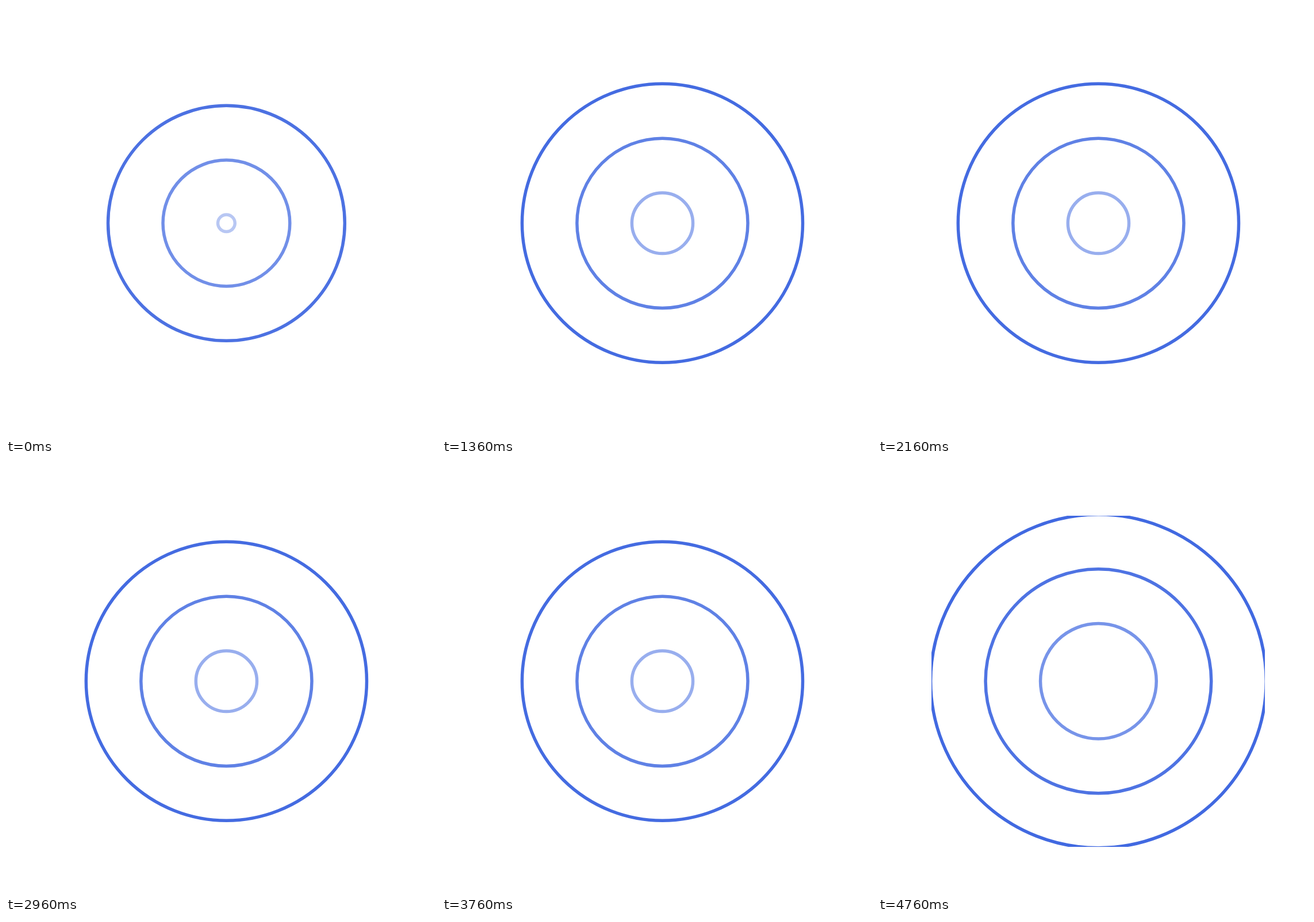
An HTML page that plays this animation: 748x748 px, repeating every 4.8 s.

```html
<!DOCTYPE html>
<html lang="en">
<head>
<meta charset="utf-8">
<title>Ripple</title>
<style>
  html, body { margin: 0; width: 100%; height: 100%; overflow: hidden; background: #fff; }
  svg { display: block; width: 748px; height: 748px; }
  ellipse { fill: none; stroke: #4169e1; stroke-width: 5.5; }
</style>
</head>
<body>
<svg viewBox="0 0 748 748">
  <clipPath id="box"><rect x="93.5" y="90" width="579.5" height="575.7"/></clipPath>
  <g id="rings" clip-path="url(#box)"></g>
</svg>
<script>
  const RINGS = 3, STEPS = 30, STEP_MS = 40;
  const LIFE = STEPS * STEP_MS;
  const START = 14.9, GROWTH = 9.55, ASPECT = 0.9935;

  const pose = n => {
    const r = START + GROWTH * n;
    return {
      rx: `${r}px`,
      ry: `${r * ASPECT}px`,
      opacity: 1 - 0.63 * (1 - n / STEPS) ** 2.2
    };
  };

  // Each pose holds for one step; the last one holds until the ring restarts.
  const frames = Array.from({ length: STEPS + 1 }, (_, n) => ({
    ...pose(Math.min(n, STEPS - 1)),
    offset: n / STEPS,
    easing: 'steps(1, end)'
  }));

  const group = document.getElementById('rings');
  for (let i = 0; i < RINGS; i++) {
    const ring = document.createElementNS('http://www.w3.org/2000/svg', 'ellipse');
    ring.setAttribute('cx', 383.4);
    ring.setAttribute('cy', 377.8);
    group.append(ring);
    // The extra millisecond keeps step edges clear of rounding.
    ring.animate(frames, {
      duration: LIFE,
      delay: -i * LIFE / RINGS - 1,
      iterations: Infinity
    });
  }
</script>
</body>
</html>
```
